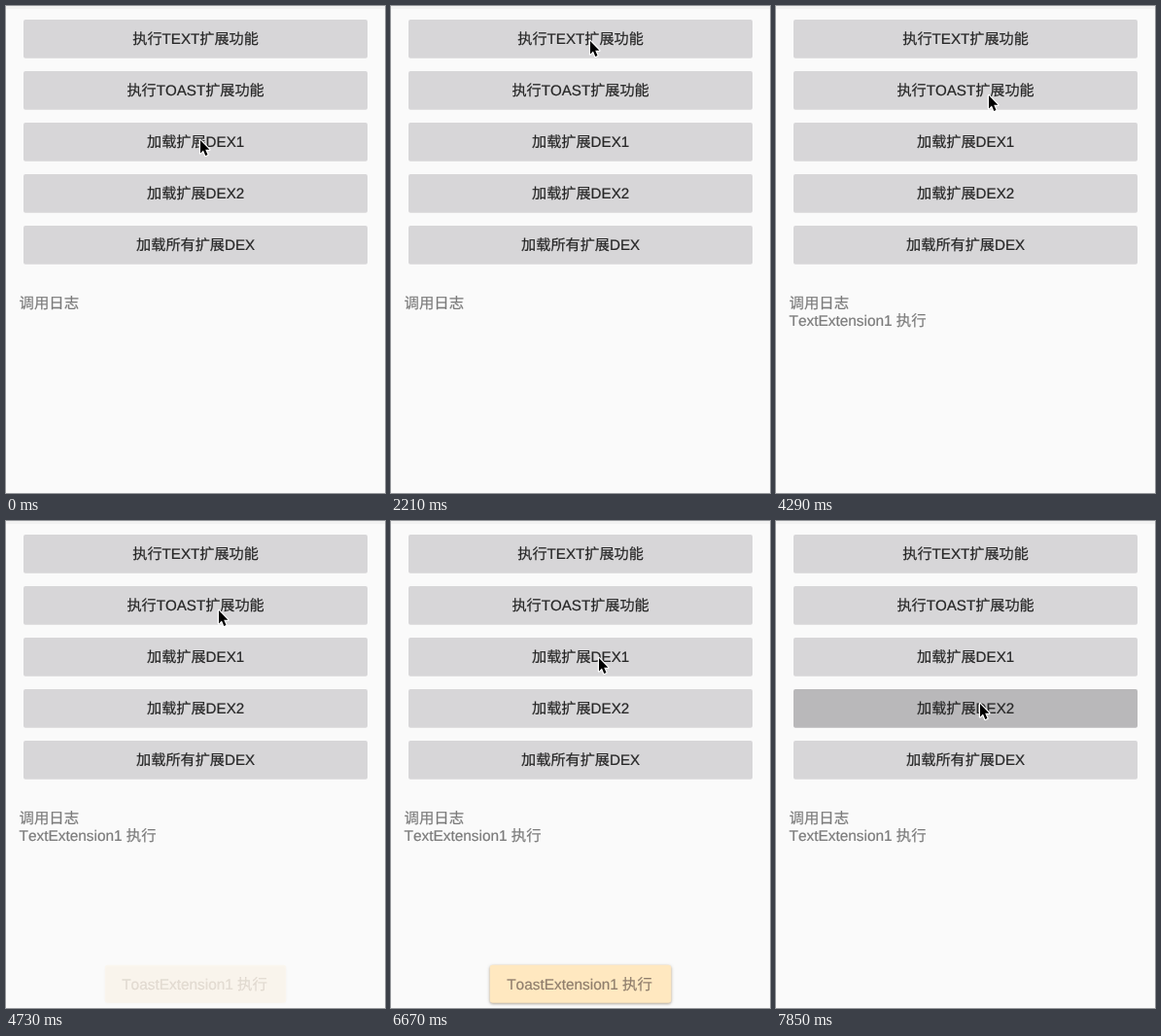
An HTML page with a canvas that plays this animation: 390 by 501 pixels, repeating every 8 s.

```html
<!DOCTYPE html>
<html lang="zh-CN">
<head>
<meta charset="utf-8">
<style>
html, body { margin: 0; width: 100%; height: 100%; overflow: hidden; background: #fafafa; }
canvas { display: block; }
</style>
</head>
<body>
<canvas id="stage" width="390" height="501"></canvas>
<script>
const ctx = document.getElementById('stage').getContext('2d');
const LOOP = 8000;
const TICK = 148.1; // the screen refreshes in steps of this many ms
const LEAD = 18;
const FAMILY = '"Liberation Sans", "Noto Sans CJK SC", "Noto Sans CJK", sans-serif';
const LABELS = ['执行TEXT扩展功能', '执行TOAST扩展功能', '加载扩展DEX1', '加载扩展DEX2', '加载所有扩展DEX'];

// Times are in ticks
const CLICKS = [
  { button: 2, at: 8, hold: 1, fade: 2 },
  { button: 0, at: 18, hold: 2, fade: 1 },
  { button: 1, at: 31, hold: 1, fade: 1 },
  { button: 3, at: 53, hold: 1, fade: 1 }
];
const HOME = [199, 137];
const MOVES = [
  { start: 11, end: 15, to: [204, 35], bend: [-9, 0] },
  { start: 22, end: 29, to: [218, 91], bend: [2, 54] },
  { start: 39, end: 45, to: [213, 140], bend: [0, 0] },
  { start: 45, end: 50, to: [209, 187], bend: [0, 0] }
];

const clamp = v => Math.max(0, Math.min(1, v));

function pointerAt(tick) {
  return MOVES.reduce((pos, { start, end, to, bend }) => {
    const p = clamp((tick - start) / (end - start));
    const ease = Math.sin(p * Math.PI / 2);
    const arc = Math.sin(p * Math.PI);
    return pos.map((v, k) => v + (to[k] - v) * ease + bend[k] * arc);
  }, HOME);
}

function shadeOf(button, tick) {
  const click = CLICKS.find(c => c.button === button);
  if (!click || tick < click.at) return 0;
  return clamp(1 - (tick - click.at - click.hold + 1) / click.fade);
}

function toastAlpha(tick) {
  const fadeIn = clamp((tick - 31) / 3) ** 1.5;
  const fadeOut = clamp((47 - tick) / 2);
  return Math.min(fadeIn, fadeOut);
}

function box(x, y, w, h, r, fill) {
  ctx.fillStyle = fill;
  ctx.beginPath();
  ctx.roundRect(x, y, w, h, r);
  ctx.fill();
}

function text(str, x, y, color, size, align = 'left') {
  ctx.font = `${size}px ${FAMILY}`;
  ctx.fontKerning = 'none';
  ctx.textRendering = 'geometricPrecision';
  ctx.textAlign = align;
  ctx.fillStyle = ctx.strokeStyle = color;
  ctx.lineWidth = 0.2;
  ctx.fillText(str, x, y);
  ctx.strokeText(str, x, y);
}

function drawButton(label, i, tick) {
  const y = 14 + i * 53;
  const grey = 215 - 30 * shadeOf(i, tick);
  box(18, y, 354, 39.7, 2, `rgb(${grey}, ${grey - 1}, ${grey + 1})`);
  text(label, 195.1, y + 25.2, '#262626', 15.15, 'center');
}

function drawToast(alpha) {
  if (!alpha) return;
  ctx.save();
  ctx.globalAlpha = alpha;
  ctx.shadowColor = `rgba(90, 70, 40, ${0.5 * alpha})`;
  ctx.shadowBlur = 3;
  ctx.shadowOffsetY = 1;
  box(101.7, 456.7, 186.6, 39, 3, '#ffe8c0');
  ctx.shadowColor = 'transparent';
  text('ToastExtension1 执行', 119.2, 482, '#8f7e6c', 15.4);
  ctx.restore();
}

function drawPointer([x, y]) {
  ctx.save();
  ctx.translate(x + 1, y + 1);
  ctx.beginPath();
  [[0, 0], [0, 13.4], [3, 10.6], [5.3, 16], [7.5, 15], [5.2, 9.8], [9.4, 9.8]]
    .forEach(([px, py]) => ctx.lineTo(px, py));
  ctx.closePath();
  ctx.lineJoin = 'round';
  ctx.lineWidth = 2.4;
  ctx.strokeStyle = '#fff';
  ctx.stroke();
  ctx.fillStyle = '#000';
  ctx.fill();
  ctx.restore();
}

function draw(ms) {
  const tick = Math.floor((ms + LEAD) / TICK);
  ctx.fillStyle = '#fafafa';
  ctx.fillRect(0, 0, 390, 501);
  ctx.fillStyle = '#f2f2f2';
  ctx.fillRect(0, 0, 390, 3);
  LABELS.forEach((label, i) => drawButton(label, i, tick));
  text('调用日志', 13.5, 311, '#7b7b7b', 15.4);
  if (tick >= 20) text('TextExtension1 执行', 13.5, 329.2, '#7b7b7b', 15.4);
  drawToast(toastAlpha(tick));
  drawPointer(pointerAt(tick));
}

const start = performance.now();
function frame() {
  draw((performance.now() - start) % LOOP);
  requestAnimationFrame(frame);
}
frame();
</script>
</body>
</html>
```
